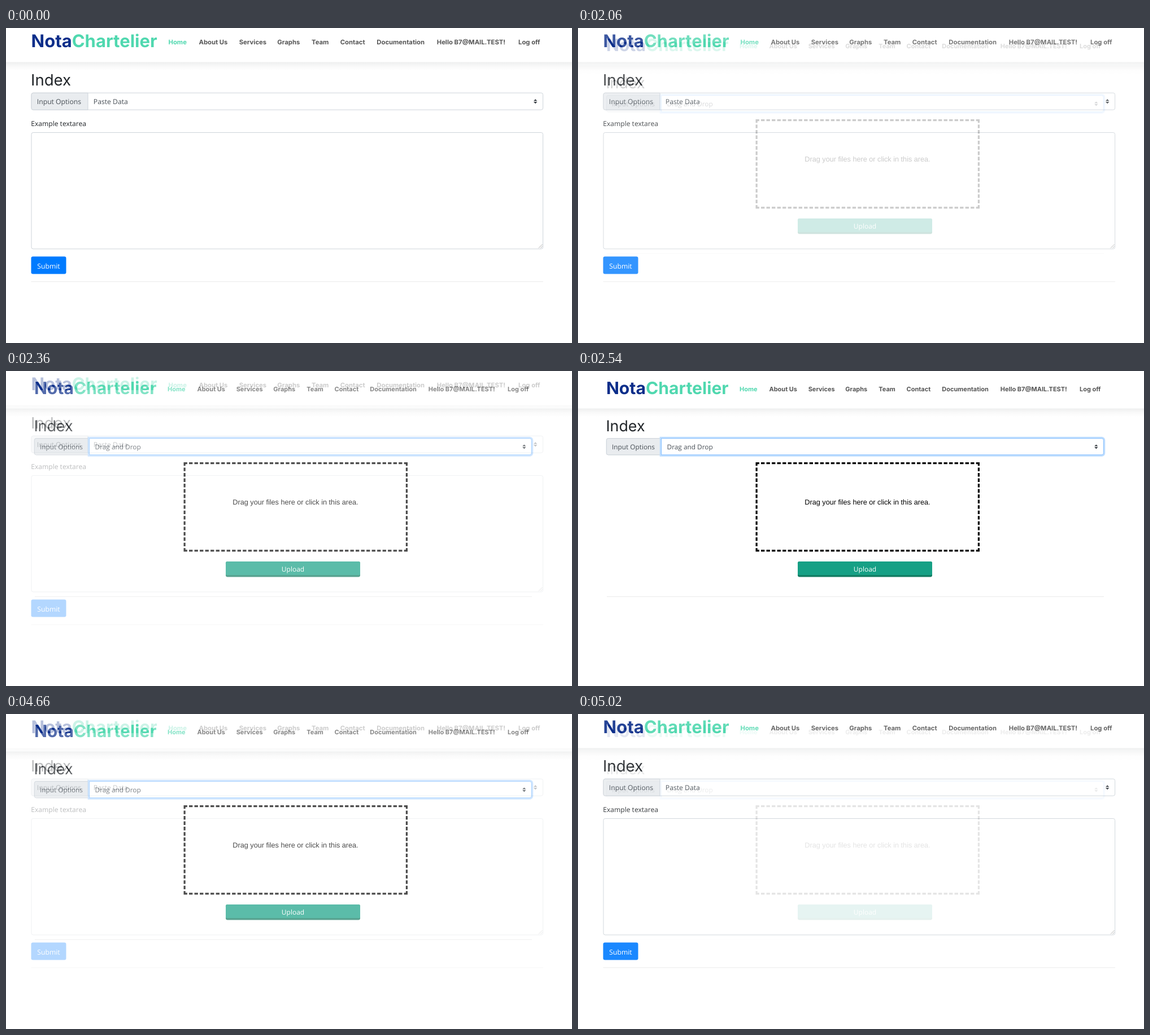
Recreate the animation shown at these times as an HTML page. Size 1002 by 559 pixels, loop 5080 ms.

```html
<!DOCTYPE html>
<html lang="en">
<head>
<meta charset="utf-8">
<title>Input options</title>
<style>
html, body { margin: 0; width: 100%; height: 100%; overflow: hidden; background: #fff; }
svg { display: block; width: 100%; height: 100%; text-rendering: geometricPrecision; }
text { font: 12.2px "Open Sans", "Noto Sans", sans-serif; fill: #212529; }
.logo { font: 700 31px Inter, sans-serif; fill: #0c2e8a; }
.logo tspan, .nav .on { fill: #50d8af; }
.nav text { font: 700 11.3px Inter, sans-serif; fill: #555; }
.title { font: 400 27.6px Inter, sans-serif; }
.field { fill: #495057; }
.button { fill: #fff; text-anchor: middle; }
.drop { font: 12.66px "Liberation Sans", Arial, sans-serif; fill: #000; text-anchor: middle; }
.box { fill: #fff; stroke: #ced4da; }
.rule { stroke: #e9e9e9; }
</style>
</head>
<body>
<svg viewBox="0 0 1002 559">
  <defs>
    <linearGradient id="shade" x2="0" y2="1">
      <stop offset="0" stop-color="#eeefef"/>
      <stop offset=".5" stop-color="#f9f9f9"/>
      <stop offset="1" stop-color="#fff"/>
    </linearGradient>
    <g id="page">
      <rect x="-10" y="60.5" width="1050" height="15" fill="url(#shade)"/>
      <text class="logo" x="44.5" y="34">Nota<tspan>Chartelier</tspan></text>
      <g class="nav" id="nav"></g>
      <text class="title" x="44" y="102">Index</text>
      <rect class="box" x="45" y="115.2" width="905.6" height="30" rx="3.2"/>
      <path d="M145 115.2H48.2a3.2 3.2 0 0 0-3.2 3.2v23.6a3.2 3.2 0 0 0 3.2 3.2H145z" fill="#e9ecef" stroke="#ced4da"/>
      <text class="field" x="54.8" y="135.3" font-size="12.4">Input Options</text>
    </g>
    <path id="arrows" d="M937.2 126.3l-3.2 3.2h6.4zm0 8l-3.2-3.2h6.4z" fill="#343a40"/>
  </defs>

  <g id="paste">
    <use href="#page"/>
    <use href="#arrows"/>
    <text class="field" x="154.8" y="135.3">Paste Data</text>
    <text x="44.2" y="174.3" style="font-size:12.1px">Example textarea</text>
    <rect class="box" x="45" y="185.5" width="905.6" height="206.5" rx="3.2"/>
    <path d="M943 390.5l6.5-6.5M946.5 390.5l3-3" stroke="#999" stroke-width=".8"/>
    <rect x="44.5" y="405.5" width="62" height="31" rx="3.2" fill="#007bff"/>
    <text class="button" x="75.5" y="426.5">Submit</text>
    <path class="rule" d="M44.5 450H951"/>
  </g>

  <g id="drag" opacity="0">
    <rect width="1002" height="559" fill="#fff"/>
    <g transform="matrix(.9717 0 0 .9717 6.65 7.7)">
      <use href="#page"/>
      <path d="M145 115.2h802.4a3.2 3.2 0 0 1 3.2 3.2v23.6a3.2 3.2 0 0 1-3.2 3.2H145z" fill="#fff" stroke="#bfdeff" stroke-width="6"/>
      <path d="M145 115.2h802.4a3.2 3.2 0 0 1 3.2 3.2v23.6a3.2 3.2 0 0 1-3.2 3.2H145z" fill="#fff" stroke="#80bdff"/>
      <use href="#arrows"/>
      <text class="field" x="155.3" y="135.3">Drag and Drop</text>
    </g>
    <path d="M314.5 163.6H711M314.5 318.9H711M316.1 162V320.5M709.4 162V320.5"
      stroke="#000" stroke-width="3.2" stroke-dasharray="6.344 3.172"/>
    <text class="drop" x="512.5" y="237">Drag your files here or click in this area.</text>
    <rect x="389" y="338" width="238" height="27.5" rx="3.2" fill="#117a60"/>
    <path d="M389 341.2a3.2 3.2 0 0 1 3.2-3.2h231.6a3.2 3.2 0 0 1 3.2 3.2v19.1q0 2-3.2 2H392.2q-3.2 0-3.2-2z" fill="#16a085"/>
    <text class="button" x="508" y="355.5" style="font-size:12px">Upload</text>
    <path class="rule" d="M51 400.3H931"/>
  </g>
</svg>
<script>
const HOLD = 2000, STEP = 60, STEPS = 9;
const HALF = HOLD + STEP * STEPS;

const links = [
  ["Home", 287.5], ["About Us", 341.5], ["Services", 412.7],
  ["Graphs", 480.3], ["Team", 541], ["Contact", 591.7],
  ["Documentation", 656.3], ["Hello B7@MAIL.TEST!", 762.7], ["Log off", 907]
];
document.getElementById("nav").innerHTML = links.map(([label, x], i) =>
  `<text x="${x}" y="29.4"${i ? "" : ' class="on"'}>${label}</text>`).join("");

const drag = document.getElementById("drag");

// Stepped cross-fade: hold, then nine equal steps to the other page.
function draw(ms) {
  const t = ms % (2 * HALF);
  const local = t % HALF;
  const fade = local < HOLD ? 0 : (Math.floor((local - HOLD) / STEP) + 1) / (STEPS + 1);
  drag.setAttribute("opacity", t < HALF ? fade : 1 - fade);
}

const start = performance.now();
function tick() {
  draw(performance.now() - start);
  requestAnimationFrame(tick);
}
tick();
</script>
</body>
</html>
```
